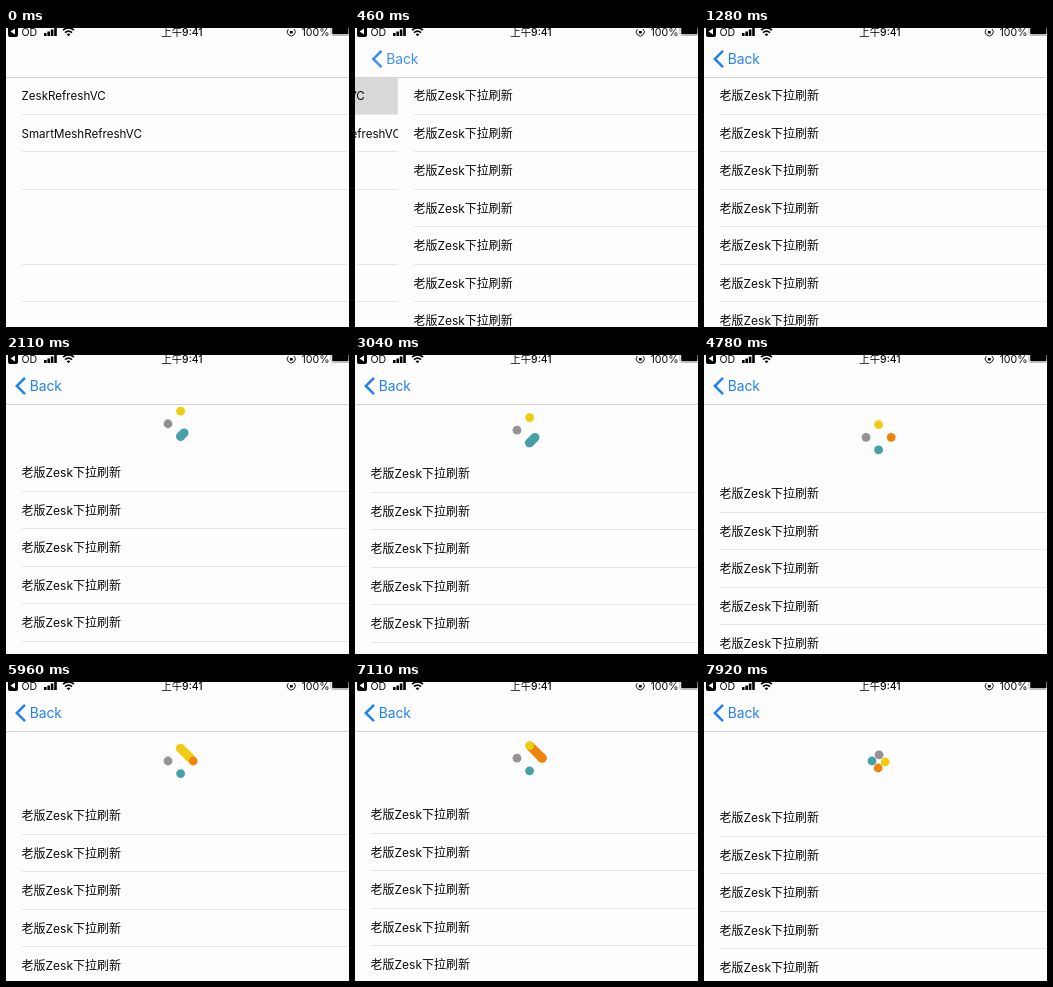
Animation, 343 px wide and 299 px high, one loop 8000 ms. Source, as an HTML page:

```html
<!DOCTYPE html>
<html lang="zh-CN">
<head>
<meta charset="utf-8">
<style>
  html, body { margin: 0; height: 100%; overflow: hidden; background: #fdfdfd; }
  svg { display: block; }
  text { font: 12px Inter, "Noto Sans CJK SC", "Noto Sans CJK", sans-serif; fill: #0a0a0a; }
  .line { fill: #e5e5e7; }
  .paper { fill: #fdfdfd; }
  #home text { font-size: 11.6px; }
  #back text { font-size: 13.8px; fill: #2381f0; }
  #status text { font-size: 10.6px; }
  #status .clock { font-size: 10.4px; font-weight: 500; }
</style>
</head>
<body>
<svg width="343" height="299" viewBox="0 0 343 299">
  <g id="home">
    <rect class="paper" width="343" height="299"/>
    <rect id="highlight" y="50" width="343" height="37" fill="#d9d9d9"/>
  </g>
  <g id="detail">
    <rect class="paper" width="343" height="299"/>
    <g id="list"></g>
    <g id="spinner"><line id="pill" stroke-width="9" stroke-linecap="round"/></g>
  </g>
  <rect class="paper" width="343" height="49"/>
  <rect y="49" width="343" height="1" fill="#d2d2d4"/>
  <g id="back">
    <path d="M19 22.8L10.8 31L19 39.2" fill="none" stroke="#2381f0" stroke-width="2.5"/>
    <text x="23.7" y="36">Back</text>
  </g>
  <g id="status">
    <rect x="2" y="-2" width="10" height="11" rx="2"/>
    <path d="M9 0.5V6.5L4.5 3.5z" fill="#fff"/>
    <text x="15.5" y="8">OD</text>
    <path d="M38 5h2.6v3H38zM41.4 3.4h2.6V8h-2.6zM44.8 1.4h2.6V8h-2.6zM48.2-1h2.6v9h-2.6z"/>
    <g fill="none" stroke="#000" stroke-width="1.7">
      <path d="M57 2.2Q62.5-2.6 68 2.2M59 4.6Q62.5 1.6 66 4.6"/>
      <path d="M282.3 1.2A4 4 0 1 0 288 1" stroke-width="0.9"/>
    </g>
    <path d="M60.6 6.2Q62.5 4.8 64.4 6.2L62.5 8.2zM283.9 3h2.8v2.4h-2.8z"/>
    <text class="clock" x="176" y="8" text-anchor="middle">上午9:41</text>
    <text x="295.5" y="8">100%</text>
    <rect x="324.9" y="-2" width="20" height="9.4" rx="2" fill="none" stroke="#999" stroke-width="0.7"/>
    <rect x="326.2" y="-1" width="16.3" height="7.2" rx="1"/>
  </g>
</svg>
<script>
const $ = id => document.getElementById(id);
const STEP = 116.6, LOOP = 8000, ROW = 37.45, WIDTH = 343, CX = 174.6;
const COLORS = ['#f0cc10', '#969196', '#45a1a5', '#ee8508'];  // top, left, bottom, right

// [step, list offset, spinner centre]
const PULL = [
  [11, 0, 30], [14, 32, 56], [17, 60, 76], [20, 22, 48], [24, 58, 76], [26, 51, 75.2],
  [28, 20, 46], [31, 60, 76], [36, 72, 83], [41, 71, 82.3], [43, 24, 50], [45, 62, 77],
  [48, 71, 82], [51, 66, 79], [52, 66, 79], [55, 22, 48], [59, 62, 77],
  [61, 64.5, 76.2], [64, 72, 83], [66, 73, 84.5], [68, 68, 79.4]
];

function add(parent, tag, attrs, text = '') {
  const node = document.createElementNS('http://www.w3.org/2000/svg', tag);
  set(node, attrs);
  node.textContent = text;
  return parent.appendChild(node);
}
function set(node, attrs) {
  for (const key in attrs) node.setAttribute(key, attrs[key]);
}
const show = (node, on) => node.style.display = on ? '' : 'none';
const clamp = v => Math.max(0, Math.min(1, v));
const move = (id, x, y) => set($(id), { transform: `translate(${x} ${y})` });

function addRow(parent, index, label, line = true) {
  const y = index * ROW;
  add(parent, 'text', { x: 15.5, y: 72.3 + y }, label);
  if (line) add(parent, 'rect', { class: 'line', x: 16, y: Math.round(86 + y), width: 330, height: 1 });
}

['ZeskRefreshVC', 'SmartMeshRefreshVC', '', '', '', ''].forEach((label, i) => addRow($('home'), i, label, i !== 3));
for (let i = 0; i < 8; i++) addRow($('list'), i, '老版Zesk下拉刷新');
const dots = COLORS.map(fill => add($('spinner'), 'circle', { r: 4.4, fill }));

function pullAt(step) {
  if (step <= PULL[0][0]) return PULL[0].slice(1);
  const next = PULL.findIndex(key => key[0] >= step);
  const a = PULL[next - 1], b = PULL[next];
  const p = (step - a[0]) / (b[0] - a[0]), e = p * p * (3 - 2 * p);
  return [1, 2].map(k => a[k] + (b[k] - a[k]) * e);
}

function drawSpinner(offset, cy, step) {
  const load = clamp((step - 66) / 2);
  const radius = 12.6 - 6 * load;
  const points = COLORS.map((_, i) => {
    const angle = (-90 - 90 * i + 94 * load) * Math.PI / 180;
    return [CX + radius * Math.cos(angle), cy + radius * Math.sin(angle)];
  });
  // Each side takes two units: a pill grows to the next dot, then shrinks into it.
  const progress = load ? 8 : (offset - 27.3) / 5.35;
  dots.forEach((dot, i) => {
    set(dot, { cx: points[i][0], cy: points[i][1] });
    show(dot, progress >= Math.max(0, 2 * i - 1));
  });
  const active = progress > 0 && progress < 8;
  show($('pill'), active);
  if (!active) return;
  const side = Math.floor(progress / 2), part = progress - 2 * side;
  const growing = part < 1, next = (side + 1) % 4;
  const from = growing ? side : next, to = growing ? next : side;
  const length = growing ? part : 2 - part;
  const [x1, y1] = points[from], [x2, y2] = points[to];
  set($('pill'), {
    x1, y1, x2: x1 + (x2 - x1) * length, y2: y1 + (y2 - y1) * length, stroke: COLORS[from]
  });
}

function draw(now) {
  const step = Math.floor((now % LOOP + 12) / STEP);
  const push = 1 - (1 - clamp((step - 1) / 6)) ** 3;
  show($('highlight'), step > 0);
  move('home', -WIDTH * 0.3 * push, 0);
  move('detail', WIDTH * (1 - push), 0);
  move('back', 60 * (1 - push), 0);
  $('back').style.opacity = push;
  const [offset, cy] = pullAt(step);
  move('list', 0, Math.round(offset));
  drawSpinner(offset, cy, step);
}

let start;
function tick(now) {
  start ??= now;
  draw(now - start);
  requestAnimationFrame(tick);
}
draw(0);
requestAnimationFrame(tick);
</script>
</body>
</html>
```
